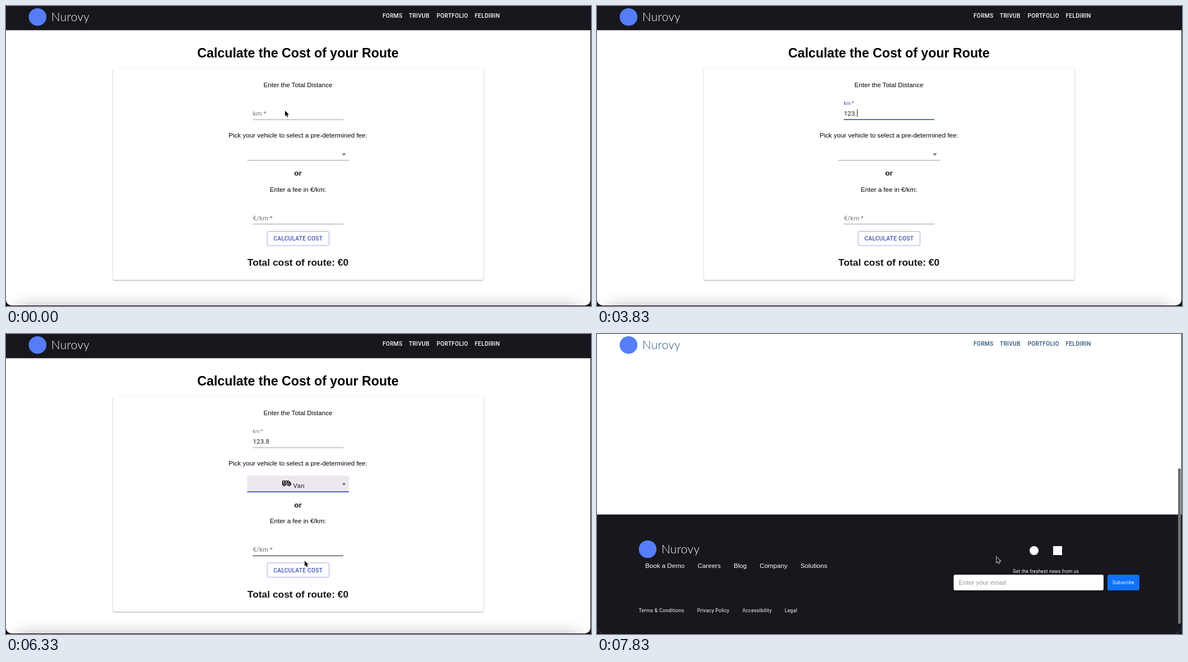
Animation, 1044 px wide and 536 px high, one loop 8000 ms. Source, as an HTML page:

```html
<!DOCTYPE html>
<html lang="en">
<head>
<meta charset="utf-8">
<title>Route cost</title>
<style>
  html, body { margin: 0; width: 100%; height: 100%; overflow: hidden; background: #111; }
  #win { position: absolute; left: 0; top: 0; width: 1043px; height: 535px; overflow: hidden;
    background: #fff; border-radius: 0 0 10px 10px; }
  #glow { position: absolute; left: 26px; right: 26px; top: 538px; height: 20px;
    box-shadow: 0 0 24px 4px rgba(50, 35, 65, .3); }
  svg { position: absolute; left: 0; top: 0; display: block; }
  text { font: 11.6px "Liberation Sans", Arial, sans-serif; white-space: pre; }
  .mid { text-anchor: middle; }
  .bold { font-weight: 700; }
  .title { font-size: 23.2px; }
  .total { font-size: 17.4px; fill: #161616; }
  .or { font-size: 13.6px; fill: #161616; }
  .ui { font-family: Roboto, sans-serif; letter-spacing: .1px; }
  .caps { font: 500 10.15px Roboto, sans-serif; letter-spacing: .29px; }
  .brand { font: 300 21px Lato, sans-serif; letter-spacing: .3px; }
  .legal { font: 8.7px Roboto, sans-serif; letter-spacing: .29px; }
  .small { font: 8.2px Roboto, sans-serif; letter-spacing: .3px; }
  .card { fill: #fff; filter: drop-shadow(0 1px .8px rgba(0, 0, 0, .36)); }
  .menu { fill: #fff; filter: drop-shadow(0 3px 4px rgba(45, 30, 65, .5)); }
</style>
</head>
<body>
<div id="win"><div id="glow"></div><svg id="view" width="1043" height="535"></svg></div>
<script>
const LOOP = 8000, FPS = 6, PAGE_SCROLL = 465;
const BLUE = '#3f51b5', GREY = '#757575', LINE = '#8f8f8f', DARK = '#17171d', LOGO = '#557df8';
const view = document.getElementById('view');

const ICONS = {
  truck: '<path opacity=".35" d="M3 6h12v9H3z"/><path d="M20 8h-3V4H3c-1.1 0-2 .9-2 2v11h2c0 1.66 1.34 3 3 3s3-1.34 3-3h6c0 1.66 1.34 3 3 3s3-1.34 3-3h2v-5l-3-4zm-.5 1.5l1.96 2.5H17V9.5h2.5zM6 18a1 1 0 1 1 0-2 1 1 0 0 1 0 2zm2.22-3a3 3 0 0 0-4.44 0H3V6h12v9H8.22zM18 18a1 1 0 1 1 0-2 1 1 0 0 1 0 2z"/>',
  van: '<path fill-rule="evenodd" d="M17 5H3a2 2 0 0 0-2 2v9h2a3 3 0 0 0 6 0h6a3 3 0 0 0 6 0h2v-5zM15 7h1l3 3h-4zM9 7h4v3H9zM3 7h4v3H3zM6 17.25a1.25 1.25 0 1 1 0-2.5 1.25 1.25 0 0 1 0 2.5zM18 17.25a1.25 1.25 0 1 1 0-2.5 1.25 1.25 0 0 1 0 2.5zM21 14h-.78a3 3 0 0 0-4.44 0H8.22a3 3 0 0 0-4.44 0H3v-2h18z"/>',
  car: '<path fill-rule="evenodd" d="M18.92 5A1.5 1.5 0 0 0 17.5 4h-11A1.5 1.5 0 0 0 5.08 5L3 11v8a1 1 0 0 0 1 1h1a1 1 0 0 0 1-1v-1h12v1a1 1 0 0 0 1 1h1a1 1 0 0 0 1-1v-8zM6.85 6h10.29l1.08 3.11H5.77zM19 16H5v-5h14z"/><circle cx="7.5" cy="13.5" r="1.5"/><circle cx="16.5" cy="13.5" r="1.5"/>'
};

// Pointer stops: time, x, y
const PATH = [
  [0, 498, 187], [500, 498, 187], [1000, 490, 191],
  [4330, 490, 195], [4670, 520, 262], [5000, 520, 264], [5330, 496, 294], [5500, 490, 316],
  [5830, 489, 317], [6330, 533, 405], [6500, 530, 417], [6840, 530, 417],
  [7170, 640, 406], [7500, 713, 399], [8000, 713, 398]
];
const TYPED = [[2330, '1'], [2830, '2'], [3170, '3'], [3660, '.'], [4160, '8']];

const clamp = v => Math.max(0, Math.min(1, v));
const mix = (a, b, p) => a + (b - a) * p;
const text = (x, y, s, cls = '', fill = '', extra = '') =>
  `<text x="${x}" y="${y}" class="${cls}"${fill && ` fill="${fill}"`} ${extra}>${s}</text>`;
const rect = (x, y, w, h, fill, r = 0, extra = '') =>
  `<rect x="${x}" y="${y}" width="${w}" height="${h}" rx="${r}" fill="${fill}" ${extra}/>`;
const shift = (dy, body) => `<g transform="translate(0 ${dy})">${body}</g>`;
const icon = (name, x, cy) =>
  `<g transform="translate(${x} ${cy - 8.7}) scale(.725)">${ICONS[name]}</g>`;
const brand = (x, y, color) =>
  `<circle cx="${x}" cy="${y}" r="15.8" fill="${LOGO}"/>` + text(x + 24.5, y + 7.5, 'Nurovy', 'brand', color);

function pointAt(t) {
  const i = Math.max(1, PATH.findIndex(k => k[0] >= t));
  const [a, b] = [PATH[i - 1], PATH[i]];
  const p = clamp((t - a[0]) / (b[0] - a[0]));
  return [mix(a[1], b[1], p), mix(a[2], b[2], p)];
}

function pointer(t) {
  if (t > 1100 && t < 4300) return '';
  const [x, y] = pointAt(t);
  const hand = t > 4600 && t < 5950 || t > 6450 && t < 6900;
  return `<g transform="translate(${x} ${y})">` + (hand
    ? '<path d="M-2.6 1v-5a1 1 0 0 1 2 0V-.8l4 .8q1.6.3 1.3 1.8L4 5v1.5h-5.2V5L-4.7 1.6q.2-1.4 2.1-.6zM1 2v2.5M2.8 2v2.5" fill="#fff" stroke="#222" stroke-width=".9"/>'
    : '<path d="M0 0v9.7l2.2-2 1.6 3.6 1.7-.8-1.6-3.4h3z" stroke="#fff" stroke-width="1.5" paint-order="stroke"/>') + '</g>';
}

function distanceField(t) {
  const up = clamp((t - 1000) / 200), focus = t > 1000 && t < 4600;
  const value = TYPED.filter(k => t >= k[0]).map(k => k[1]).join('');
  const label = text(440.5, mix(195.5, 177, up), 'km\u2009*', 'ui', focus ? BLUE : GREY,
    `style="font-size:${mix(11.6, 8.7, up)}px"`);
  const caretX = 441 + [...value].reduce((w, c) => w + (c === '.' ? 3.15 : 6.6), 0);
  const last = Math.max(1000, ...TYPED.filter(k => t >= k[0]).map(k => k[0]));
  const caret = focus && (t - last) % 1000 < 500 ? rect(caretX, 185, 1, 13, '#222') : '';
  return label + text(440.5, 195.5, value, 'ui', '#222') + caret + rect(440.5, 202.6, 161.5, .9, LINE)
    + (focus ? rect(521.2 - 80.75 * up, 202, 161.5 * up, 1.5, BLUE) : '');
}

function vehicleField(t, picked, dy) {
  const focus = t > 4800 && t < 6650;
  return (picked && focus ? rect(430.5, 253, 181.5, 29.5, '#ece8ed', 2) : '')
    + rect(430.5, 275.3 + dy, 181.5, .9, LINE)
    + (focus ? rect(430.5, 274.6 + dy, 181.5, 1.6, BLUE) : '')
    + `<path d="M599.4 ${263.6 + dy / 2}h7.3l-3.65 3.7z" fill="#666"/>`
    + (picked ? icon('van', 492.2, 267) + text(512.5, 275, 'Van', 'ui', '#222') : '');
}

function menu(t) {
  const hover = t < 5160 ? 252 : t < 5600 ? 278 : 304;
  return '<rect x="430.5" y="246" width="181.5" height="116" rx="3" class="menu"/>'
    + rect(430.5, hover, 181.5, 26, '#f3f3f3')
    + text(442.5, 269, 'Pick One', 'ui', '#222', 'font-style="italic"')
    + ['truck', 'van', 'car'].map((name, i) => icon(name, 442.2, 291 + 26 * i)
      + text(459.6, 295 + 26 * i, name[0].toUpperCase() + name.slice(1), 'ui', '#222')).join('');
}

function form(t) {
  const picked = t > 5800, dy = picked ? 6.5 : 0;
  const nearFee = t > 6250 && t < 6400, hover = t > 6450 && t < 7000;
  const cost = t > 6800 ? (123.8 * .25).toFixed(2) : 0;
  return text(521, 91.5, 'Calculate the Cost of your Route', 'mid bold title')
    + `<rect x="191" y="111.5" width="661" height="${378 + dy}" rx="3" class="card"/>`
    + text(521, 144.5, 'Enter the Total Distance', 'mid')
    + distanceField(t)
    + text(521, 234.5, 'Pick your vehicle to select a pre-determined fee:', 'mid')
    + vehicleField(t, picked, dy)
    + shift(dy,
      text(521, 303, 'or', 'mid bold or')
      + text(521, 331.5, 'Enter a fee in €/km:', 'mid')
      + text(440.5, 382.5, '€/km\u2009*', 'ui', GREY)
      + rect(440.5, 389.2, 161.5, nearFee ? 1.2 : .9, nearFee ? '#333' : LINE)
      + rect(466, 402.5, 110.5, 25.5, hover ? '#f7f8fc' : '#fff', 3, 'stroke="#9fa8da"')
      + text(521.2, 419, 'CALCULATE COST', 'mid caps', BLUE)
      + text(521, 464, `Total cost of route: €${cost}`, 'mid bold total'))
    + (t > 4800 && !picked ? menu(t) : '');
}

function footer() {
  const row = (items, y, cls) => items.map(([x, s]) => text(x, y, s, cls, '#fff')).join('');
  return rect(0, 322.5, 1043, 214, DARK) + brand(90.4, 384.5, '#fff')
    + row([[86, 'Book a Demo'], [179.5, 'Careers'], [244, 'Blog'], [290.3, 'Company'], [363.3, 'Solutions']], 417.5, '')
    + row([[74.5, 'Terms &amp; Conditions'], [178.7, 'Privacy Policy'], [259.5, 'Accessibility'], [335, 'Legal']], 496.5, 'legal')
    + '<circle cx="780" cy="387" r="8" fill="#fff"/>' + rect(814, 379, 16, 16, '#fff')
    + text(801, 427, 'Get the freshest news from us', 'mid small', '#fff')
    + rect(636.5, 430, 267.5, 28, '#fff', 3) + text(645.5, 448, 'Enter your email', '', '#969696')
    + rect(911, 430, 57, 28, '#1071fb', 3) + text(939.5, 447, 'Subscribe', 'mid small', '#fff');
}

function header(scrolled) {
  const ink = scrolled ? '#2b527a' : '#fff';
  const links = [[672, 'FORMS'], [719, 'TRIVUB'], [768.5, 'PORTFOLIO'], [836.5, 'FELDIRIN']];
  return rect(0, 0, 1043, 43.3, scrolled ? '#fff' : DARK) + brand(56.3, 19.7, ink)
    + links.map(([x, s]) => text(x, 20.7, s, 'caps', ink)).join('');
}

function draw(t) {
  const scroll = t < 7600 ? 0 : t < 7800 ? 150 : PAGE_SCROLL;
  view.innerHTML = shift(-scroll, form(t)) + shift(PAGE_SCROLL - scroll, footer()) + header(scroll > 0)
    + (scroll ? rect(1037, scroll * .516, 5, 278, '#707074', 2.5) : '') + pointer(t);
}

let shown = -1;
function tick() {
  const step = Math.floor(performance.now() % LOOP * FPS / 1000 + .03) % (LOOP * FPS / 1000);
  if (step !== shown) draw((shown = step) * 1000 / FPS);
  requestAnimationFrame(tick);
}
tick();
</script>
</body>
</html>
```
